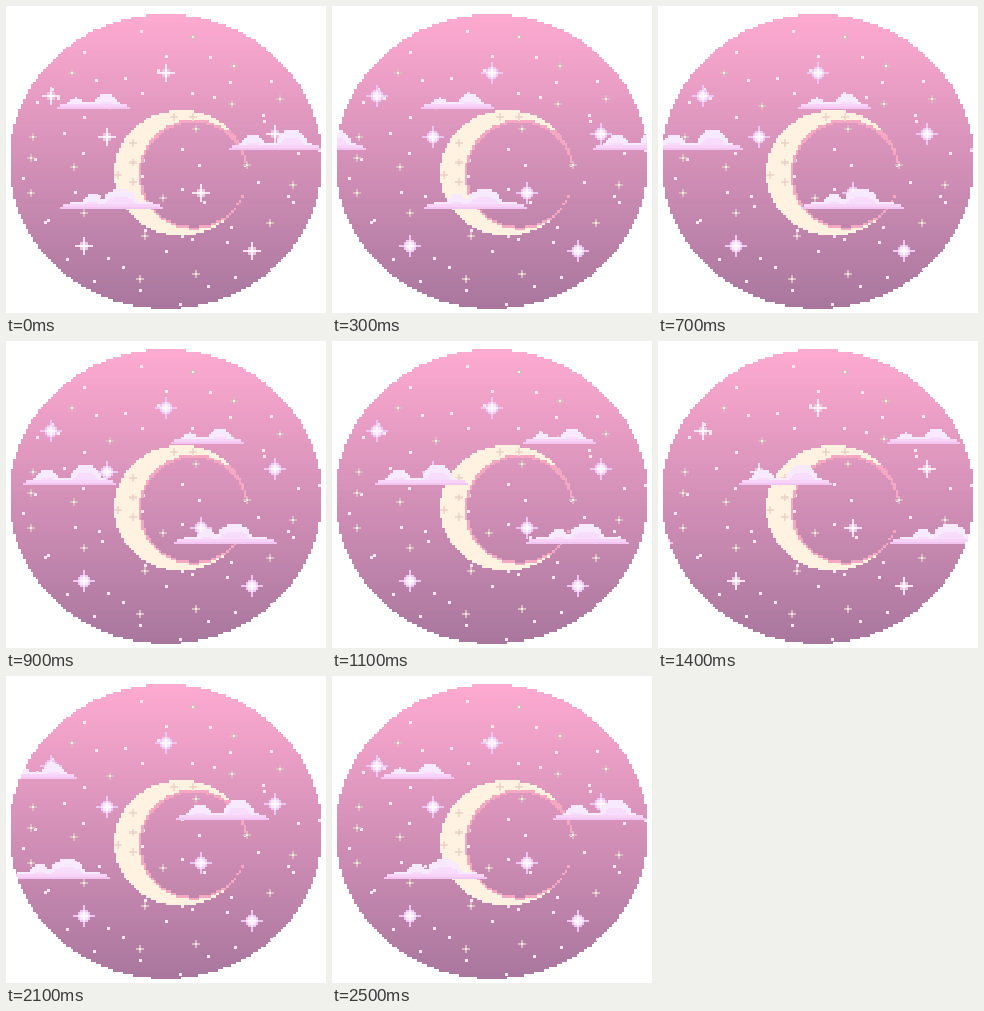
An HTML page with a canvas for the animation above (2.6 s loop, 320 by 307 pixels).

```html
<!DOCTYPE html>
<html lang="en">
<head>
<meta charset="utf-8">
<title>Pixel moon</title>
<style>
html, body { margin: 0; width: 100%; height: 100%; overflow: hidden; background: #fff; }
canvas { display: block; width: 320px; height: 307px; }
</style>
</head>
<body>
<canvas id="sky" width="320" height="307"></canvas>
<script>
const W = 320, H = 307, U = 2.5, STEP = 100, FRAMES = 26, SPEED = 12.72;
const disc = { x: 159.7, y: 155.2, rx: 156.2, ry: 147.2 };
const moon = { x: 174.8, y: 166.7, rx: 66.8, ry: 62.7 };
const hollow = { x: 187.5, y: 168.3, rx: 52.5, ry: 52.3 };
const rim = { ...hollow, rx: 55, ry: 54.8 };

const stars = [[160, 67], [45, 90], [101, 131], [269, 128], [195, 187], [78, 240], [246, 245]];
const sparks = [
  [187, 31], [66, 67], [228, 60], [104, 100], [226, 98], [274, 93], [190, 123],
  [27, 131], [25, 152], [68, 161], [25, 187], [241, 159], [157, 192], [287, 179],
  [78, 207], [139, 230], [264, 217], [134, 273], [190, 268]
];

// Width and bumps are in cells; a bump is [centre, radius, height].
const clouds = [
  { x: 51, base: 103, width: 29, bumps: [[7.5, 4.5, 4.6], [19.5, 5, 6.2]] },
  { x: 223, base: 144, width: 37, bumps: [[9.5, 5.5, 6.4], [25, 7, 8.2]] },
  { x: 54, base: 203, width: 41, bumps: [[13, 4.5, 6.2], [24, 7.5, 8.3]] }
];

const ctx = document.getElementById('sky').getContext('2d');

function layer(width, height) {
  const canvas = document.createElement('canvas');
  canvas.width = width;
  canvas.height = height;
  return canvas;
}

function rect(c, x, y, w, h, color) {
  const l = Math.round(x), t = Math.round(y);
  c.fillStyle = color;
  c.fillRect(l, t, Math.round(x + w) - l, Math.round(y + h) - t);
}

function cell(c, x, y, color) {
  rect(c, x, y, U, U, color);
}

function inside(x, y, e) {
  return ((x - e.x) / e.rx) ** 2 + ((y - e.y) / e.ry) ** 2 <= 1;
}

function randomizer(seed) {
  return () => {
    seed = (seed * 16807) % 2147483647;
    return seed / 2147483647;
  };
}

// Pixel star: shade gives a colour, or nothing, for each cell offset.
function drawStar(c, x, y, reach, shade) {
  for (let dy = -reach; dy <= reach; dy++) {
    for (let dx = -reach; dx <= reach; dx++) {
      const color = shade(Math.abs(dx) + Math.abs(dy), dx === 0 || dy === 0);
      if (color) cell(c, x + (dx - 0.5) * U, y + (dy - 0.5) * U, color);
    }
  }
}

const dim = (d, arm) => d < 2 ? '#fff7fc' : arm ? '#f9e3f2' : d < 3 && '#e9c6e0';
const lit = (d, arm) => d < 2 ? '#fff9ff' : d < 3 ? '#f8e4fb' : (arm || d < 4) && '#ecc5f3';
const plus = (arm, mid) => d => d < 1 ? mid : d < 2 && arm;

function discPath() {
  const path = new Path2D();
  for (let y = 8; y < 303; y += U) {
    const k = (y + U / 2 - disc.y) / disc.ry;
    const half = Math.round(disc.rx * Math.sqrt(Math.max(0, 1 - k * k)) / U) * U;
    const l = Math.round(disc.x - half), t = Math.round(y);
    path.rect(l, t, Math.round(2 * half), Math.round(y + U) - t);
  }
  return path;
}

function skyColor(t) {
  const top = [254, 170, 209], bottom = [168, 118, 157];
  return `rgb(${top.map((v, i) => Math.round(v + (bottom[i] - v) * t))})`;
}

// One dot per square of a loose grid
function drawDots(c) {
  const random = randomizer(77), gap = 36;
  for (let y = 14; y < 300; y += gap) {
    for (let x = 4; x < 316; x += gap) {
      const dx = x + random() * gap, dy = y + random() * gap;
      rect(c, Math.round(dx), Math.round(dy), 3, 3, '#fbe6f0');
    }
  }
}

function drawMoon(c) {
  for (let y = 104; y < 231; y += U) {
    for (let x = 107.5; x < 243; x += U) {
      const mx = x + U / 2, my = y + U / 2;
      const gap = mx > 220 && my > 157 && my < 188;
      if (gap || !inside(mx, my, moon) || inside(mx, my, hollow)) continue;
      cell(c, x, y, inside(mx, my, rim) || mx > 223 ? '#f5a8c2' : '#fff2e0');
    }
  }
  const mark = plus('#efdbcd', '#ead2c7');
  for (let i = 0; i < 3; i++) drawStar(c, 127, 137 + 19.5 * i, 1, mark);
  for (let i = 0; i < 2; i++) drawStar(c, 168 + 19 * i, 111, 1, mark);
  drawStar(c, 112, 169, 1, mark);
}

function makeSky() {
  const sky = layer(W, H), c = sky.getContext('2d');
  for (let y = 8; y < 303; y += U) rect(c, 0, y, W, U, skyColor((y - 8) / 295));
  drawDots(c);
  drawMoon(c);
  for (const [x, y] of sparks) drawStar(c, x, y, 1, plus('#d9b8c2', '#f7eee2'));
  return sky;
}

function cloudHeight({ width, bumps }, x) {
  const skirt = 1 + Math.min(2.4, Math.min(x, width - x) / 2.5);
  const tops = bumps.map(([mid, r, h]) => h * Math.sqrt(Math.max(0, 1 - ((x - mid) / r) ** 2)));
  return Math.round(Math.max(skirt, ...tops));
}

function makeCloud(cloud) {
  const canvas = layer(Math.ceil(cloud.width * U), 24), c = canvas.getContext('2d');
  for (let i = 0; i < cloud.width; i++) {
    const h = cloudHeight(cloud, i + 0.5);
    for (let j = 0; j < h; j++) {
      const color = j === 0 ? '#f3c5f1' : j === 1 ? '#f8d3f8' : h - j < 4 ? '#f7eafe' : '#f8dcfb';
      cell(c, i * U, 24 - (j + 1) * U, color);
    }
  }
  return canvas;
}

const sky = makeSky();
for (const cloud of clouds) cloud.image = makeCloud(cloud);
ctx.fillStyle = '#fff';
ctx.fillRect(0, 0, W, H);
ctx.clip(discPath());

function draw(now) {
  const n = Math.floor(now / STEP) % FRAMES;
  ctx.drawImage(sky, 0, 0);
  for (const [x, y] of stars) drawStar(ctx, x, y, n % 2 ? 4 : 3, n % 2 ? lit : dim);
  for (const { x, base, image } of clouds) {
    const left = Math.round((x + n * SPEED) % W);
    ctx.drawImage(image, left, base - 24);
    ctx.drawImage(image, left - W, base - 24);
  }
}

const start = performance.now();
function tick() {
  draw(performance.now() - start);
  requestAnimationFrame(tick);
}
tick();
</script>
</body>
</html>
```
